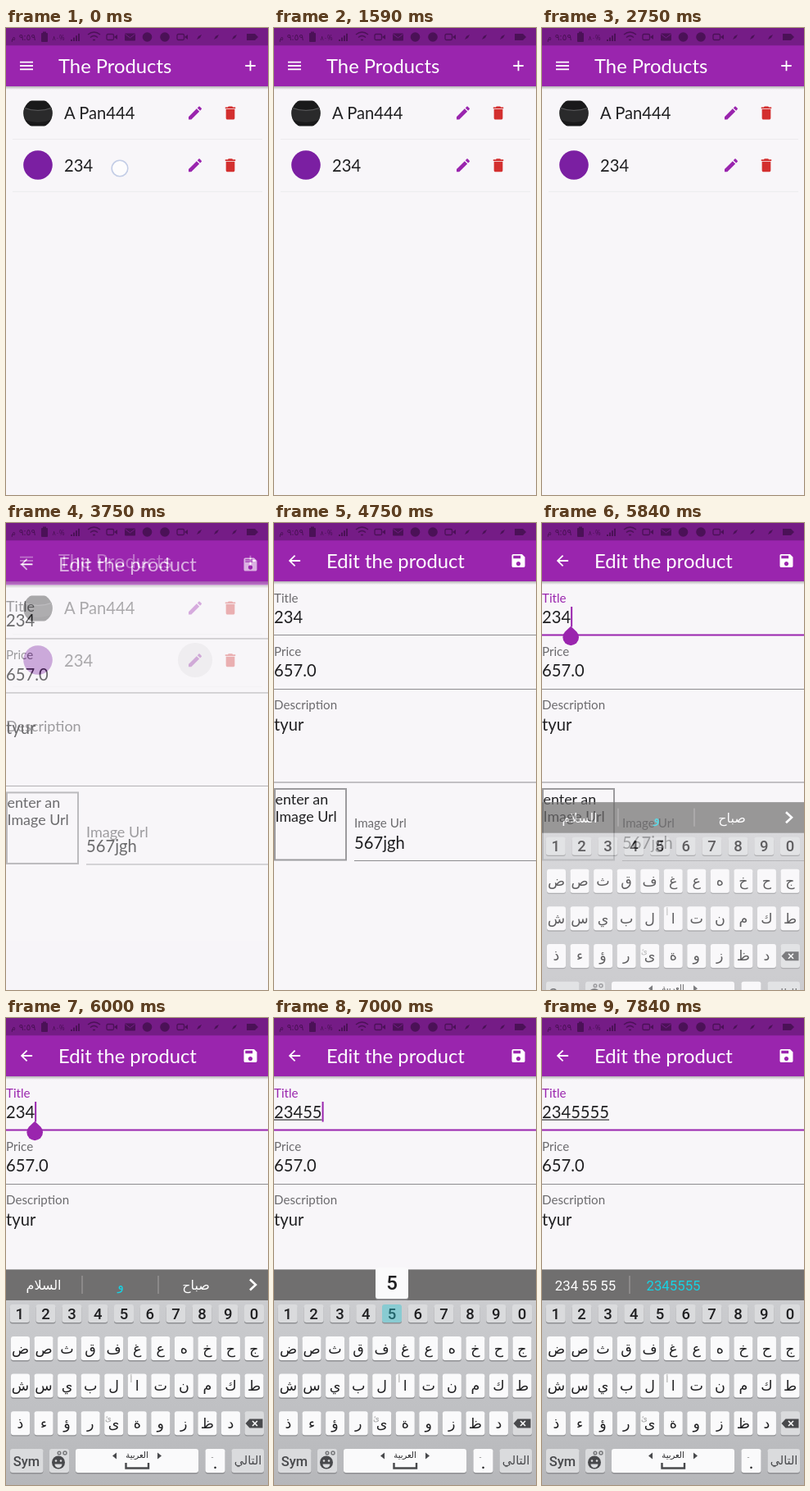
Recreate the animation shown at these times as an HTML page. Size 320 by 569 pixels, loop 8 s.

```html
<!DOCTYPE html>
<html lang="en">
<head>
<meta charset="utf-8">
<title>Product editor</title>
<style>
html, body { margin: 0; width: 100%; height: 100%; overflow: hidden; background: #f8f6f9; }
svg { display: block; width: 100vw; height: 100vh; }
text { font-family: Lato, sans-serif; font-size: 20.2px; fill: #202022; }
.bar { font-size: 23.8px; fill: #fff; }
.label { font-size: 15.15px; fill: #6c6b6e; }
.hint { font-size: 17.9px; }
.mid { text-anchor: middle; }
.num, .pick { font-family: Roboto, sans-serif; text-anchor: middle; }
.num { font-size: 18.5px; font-weight: 500; }
.pick { font-size: 16.8px; fill: #fff; }
.ar { font-family: "Noto Sans", "DejaVu Sans", sans-serif; font-size: 17.5px; text-anchor: middle; }
.cyan { fill: #16d3e4; }
</style>
</head>
<body>
<svg id="stage" viewBox="0 0 320 569" preserveAspectRatio="none">
  <defs>
    <linearGradient id="shade" x2="0" y2="1">
      <stop stop-color="#000" stop-opacity=".28"/><stop offset="1" stop-color="#000" stop-opacity="0"/>
    </linearGradient>
    <linearGradient id="board" x2="0" y2="1">
      <stop stop-color="#cfd0d3"/><stop offset="1" stop-color="#b6b7ba"/>
    </linearGradient>
    <clipPath id="round"><circle cx="39" cy="104" r="17.8"/></clipPath>
  </defs>
  <g id="list"></g>
  <g id="edit"></g>
  <g id="status"></g>
  <g id="keyboard"></g>
  <g id="popup"></g>
  <circle id="ring" r="9.8" fill="#fff" fill-opacity=".65" stroke="#c3cde6" stroke-width="1.6"/>
</svg>
<script>
const LOOP = 8000, DIGIT = 11.72, PURPLE = '#9a25ae';
const $ = id => document.getElementById(id);
const icons = {
  menu: 'M3 18h18v-2H3v2zm0-5h18v-2H3v2zm0-7v2h18V6H3z',
  add: 'M19 13h-6v6h-2v-6H5v-2h6V5h2v6h6v2z',
  back: 'M20 11H7.83l5.59-5.59L12 4l-8 8 8 8 1.41-1.41L7.83 13H20v-2z',
  save: 'M17 3H5c-1.11 0-2 .9-2 2v14c0 1.1.89 2 2 2h14c1.1 0 2-.9 2-2V7l-4-4zm-5 16c-1.66 0-3-1.34-3-3s1.34-3 3-3 3 1.34 3 3-1.34 3-3 3zm3-10H5V5h10v4z',
  pencil: 'M3 17.25V21h3.75L17.81 9.94l-3.75-3.75L3 17.25zM20.71 7.04c.39-.39.39-1.02 0-1.41l-2.34-2.34c-.39-.39-1.02-.39-1.41 0l-1.83 1.83 3.75 3.75 1.83-1.83z',
  bin: 'M6 19c0 1.1.9 2 2 2h8c1.1 0 2-.9 2-2V7H6v12zM19 4h-3.5l-1-1h-5l-1 1H5v2h14V4z'
};

const text = (x, y, s, cls = '', extra = '') => `<text x="${x}" y="${y}" class="${cls}" ${extra}>${s}</text>`;
const rect = (x, y, w, h, fill, extra = '') => `<rect x="${x}" y="${y}" width="${w}" height="${h}" fill="${fill}" ${extra}/>`;
const path = (d, extra) => `<path d="${d}" ${extra}/>`;
const icon = (name, x, y, fill = '#fff') =>
  path(icons[name], `fill="${fill}" transform="translate(${x - 10.67} ${y - 10.67}) scale(.889)"`);
const appBar = (left, title, right) =>
  rect(0, 0, 320, 569, '#f8f6f9') + rect(0, 71, 320, 4, 'url(#shade)') + rect(0, 0, 320, 71, PURPLE) +
  icon(left, 25, 46) + text(64, 54.7, title, 'bar') + icon(right, 298.5, 46);

function drawList() {
  const row = (y, name) => text(71, y + 7.3, name) + icon('pencil', 231, y, PURPLE) +
    icon('bin', 274, y, '#d32f2f') + rect(8, y + 31.5, 305, 1, '#ecebed');
  return appBar('menu', 'The Products', 'add') + row(103.5, 'A Pan444') + row(167.3, '234') +
    `<g clip-path="url(#round)">${rect(19, 88.5, 40, 31, '#19191a', 'rx="9"')}` +
    path('M21 96Q39 103 57 96L55 112Q39 118 23 112Z', 'fill="#2a2a2b"') +
    path('M21 97Q39 104 57 97', 'fill="none" stroke="#58585a"') + '</g>' +
    '<circle cx="39" cy="167" r="17.8" fill="#7b1fa2"/>' +
    '<circle id="ripple" cx="231" cy="167" fill="#000" fill-opacity=".1"/>';
}

function drawEdit() {
  const line = (y, x = 0) => rect(x, y, 320 - x, 1, '#8d8c8f');
  const label = (id, x, y, s) => `<g id="${id}">${text(x, y, s, 'label')}</g>`;
  return appBar('back', 'Edit the product', 'save') +
    label('lTitle', 0, 96.5, 'Title') + text(0, 121.5, '234', '', 'id="value"') + line(136) +
    rect(0, 123.5, 1, 1.1, '#202022', 'id="composing"') +
    label('lPrice', 0, 162, 'Price') + text(0, 187.2, '657.0') + line(202) +
    label('lDesc', 0, 227.3, 'Description') + text(0, 252.5, 'tyur') + line(315.5) +
    rect(1, 324, 87, 86.5, 'none', 'stroke="#9c9b9e" stroke-width="2"') +
    text(1.5, 342.5, 'enter an', 'hint') + text(1.5, 363.5, 'Image Url', 'hint') +
    label('lUrl', 98, 371.3, 'Image Url') + text(98, 396.8, '567jgh') + line(411, 98) +
    `<g id="focus">${rect(0, 135.5, 320, 2, PURPLE)}</g>` +
    rect(0, 102, 2, 24.5, PURPLE, 'id="caret"') +
    path('M35.2 125.8L42.3 132.6A9.8 9.8 0 1 1 28.1 132.6Z', `id="handle" fill="${PURPLE}"`);
}

function drawStatus() {
  const ink = '#4b1157', stroke = `fill="none" stroke="${ink}" stroke-width="1.3"`;
  const cam = x => rect(x - 6, 7.5, 8.5, 7, 'none', `rx="1.5" stroke="${ink}" stroke-width="1.3"`) +
    path(`M${x + 3} 11l4-3v6z`, `fill="${ink}"`);
  const small = (x, s, size) => text(x, 15, s, 'ar', `style="font-size:${size}px;fill:${ink}"`);
  const bars = [0, 1, 2, 3].map(i => rect(79 + i * 3, 14 - i * 2.4, 2, 2 + i * 2.4, ink)).join('');
  const leaves = [236, 257, 279].map(x => path(`M${x - 3} 14l2-4 4-2-2 4z`, `fill="${ink}"`)).join('');
  return rect(0, 0, 320, 21.3, '#751c86') + small(9, 'م', 9) + small(26, '٩:٥٩', 11) +
    rect(43, 6, 8, 11, ink, 'rx="1"') + rect(45, 4.5, 4, 2, ink) + small(64, '٨٠%', 8) + bars +
    path('M100 8Q107.500 2 115 8M103 11.500Q107.500 7.500 112 11.500M106 14.500h3', stroke) +
    cam(129) + rect(145, 6.5, 13, 9, ink, 'rx="1"') +
    path('M145.500 7.500l6 4.500 6-4.500', 'fill="none" stroke="#751c86"') +
    `<circle cx="172.500" cy="11" r="5.800" fill="${ink}"/><circle cx="194" cy="11" r="5.800" fill="${ink}"/>` +
    cam(215) + leaves + path('M294 7h10l4 4-4 4h-10z', `fill="${ink}"`);
}

function key(x, y, w, h, fill) {
  return rect(x, y + 1.4, w, h, '#8f9093', 'rx="3"') + rect(x, y, w, h, fill, 'rx="3"');
}

function drawKeyboard() {
  const grey = '#dadbdd', white = '#fafafb', dark = '#48494c';
  let s = rect(0, 306.5, 320, 263, 'url(#board)') + rect(0, 306.5, 320, 37.5, '#706f6f');
  const divider = x => rect(x, 314, 1, 22, '#a5a4a4');
  s += `<g id="greetings">${divider(92.5)}${divider(185.5)}` +
    text(46, 331, 'السلام', 'ar', 'style="fill:#fff;font-size:16px"') +
    text(140, 331, 'و', 'ar cyan', 'style="font-size:16px"') +
    text(232, 331, 'صباح', 'ar', 'style="fill:#fff;font-size:16px"') +
    path('M298 318.500l7 6.500-7 6.500', 'fill="none" stroke="#fff" stroke-width="2.600"') + '</g>';
  s += `<g id="guesses">${divider(106.5)}${text(53, 332, '234 55 55', 'pick')}${text(160.5, 332, '2345555', 'pick cyan')}</g>`;
  [...'1234567890'].forEach((n, i) => {
    const x = 16.8 + i * 31.8;
    s += key(x - 12, 349, 24, 22, grey) + text(x, 366.7, n, 'num');
  });
  s += rect(132, 349, 24, 22, '#25b7c6', 'id="pressed" rx="3" fill-opacity=".45"');
  ['ضصثقفغعهخحج', 'شسيبلاتنمكط', 'ذءؤرىةوزظد'].forEach((row, r) => {
    const y = 388 + r * 45.6;
    [...row].forEach((c, i) => {
      const x = 17.5 + i * 28.55;
      s += key(x - 11.5, y, 23, 29, white) + text(x, y + 20.5, c, 'ar');
    });
  });
  s += text(153, 444, 'أ', 'ar', 'style="font-size:10px;fill:#999"') +
    text(125, 491, 'ئ', 'ar', 'style="font-size:10px;fill:#999"');
  s += key(291.5, 479.2, 23.5, 29, grey) + path('M292.500 494l5-5.500h16v11h-16z', `fill="${dark}"`) +
    path('M301 491l6 6m0-6l-6 6', 'stroke="#fff" stroke-width="1.500"');
  s += key(5, 525, 40.5, 29, grey) + text(25, 545.5, 'Sym', 'num', `style="font-size:16.5px;fill:${dark}"`) +
    key(53, 525, 24, 29, grey) + `<circle cx="64" cy="541.500" r="8" fill="${dark}"/>` +
    path('M59.500 543.500h9a4.500 4.500 0 0 1-9 0z', `fill="${grey}"`) +
    `<circle cx="61" cy="539.500" r="1.300" fill="${grey}"/><circle cx="67" cy="539.500" r="1.300" fill="${grey}"/>` +
    '<g fill="none" stroke="#77787b" stroke-width="1.500"><circle cx="65" cy="530" r="1.800"/><circle cx="72" cy="530" r="2"/></g>';
  s += key(85, 525, 150, 29, white) + text(160, 536, 'العربية', 'ar', 'style="font-size:10px"') +
    path('M135 529.500v8l-5-4zM185 529.500v8l5-4z', `fill="${dark}"`) +
    path('M146.500 542v6.500h27.500v-6.500', `fill="none" stroke="${dark}" stroke-width="2.400"`) +
    key(243.5, 525, 24, 29, white) + text(255.5, 549, '.', 'num') +
    text(252, 538, '-', 'num', 'style="font-size:9px;fill:#999"') +
    key(275.5, 525, 39.5, 29, grey) + text(295.5, 544, 'التالي', 'ar', `style="font-size:14.5px;fill:${dark}"`);
  return s;
}

$('list').innerHTML = drawList();
$('edit').innerHTML = drawEdit();
$('status').innerHTML = drawStatus();
$('keyboard').innerHTML = drawKeyboard();
$('popup').innerHTML = key(124, 304, 40, 38, '#fafafb') + text(144, 331, '5', 'num', 'style="font-size:24px"');

// Each step is [time, ...values]; values are interpolated between steps.
function track(t, steps) {
  const i = steps.findIndex(s => s[0] > t);
  if (i < 0) return steps[steps.length - 1].slice(1);
  if (i === 0) return steps[0].slice(1);
  const a = steps[i - 1], b = steps[i], k = (t - a[0]) / (b[0] - a[0]);
  return a.slice(1).map((v, j) => v + (b[j + 1] - v) * k);
}
const within = (t, a, b) => t >= a && t < b;
const show = (id, on) => $(id).setAttribute('visibility', on ? 'visible' : 'hidden');
const pose = (id, opacity, y) => {
  $(id).setAttribute('opacity', opacity);
  $(id).setAttribute('transform', `translate(0 ${y})`);
};

const presses = [6590, 6920, 7170, 7420];
// time, x, y, opacity
const touch = [
  [0, 139, 171, 1], [90, 139, 171, 1], [500, 140, 173, .3], [590, 140, 173, 0],
  [2080, 200, 164, 0], [2090, 200, 164, .8], [2600, 230, 165, .8], [2750, 231, 165, 0],
  [3410, 231, 166, 0], [3420, 231, 166, .9], [3580, 231, 166, .9], [3670, 231, 166, 0],
  [5490, 90, 115, 0], [5500, 90, 115, .9], [5590, 90, 115, .9], [5670, 90, 115, 0]
];
const pageIn = [[3710, .5, 10], [3750, .64, 4.5], [3840, .94, .6], [3920, 1, 0]];
const boardIn = [[5670, 0, 130], [5750, .35, 78], [5840, .7, 34], [5920, .93, 8], [6000, 1, 0]];
const floating = { lTitle: [0, 96.5, 7.5], lDesc: [0, 227.3, 22], lUrl: [98, 371.3, 7.5] };

function render(t) {
  const [x, y, seen] = track(t, touch);
  $('ring').setAttribute('cx', x);
  $('ring').setAttribute('cy', y);
  $('ring').setAttribute('opacity', seen);

  show('ripple', within(t, 3420, 3920));
  $('ripple').setAttribute('r', track(t, [[3420, 6], [3640, 21]])[0]);

  const [alpha, dy] = track(t, pageIn);
  pose('edit', t < 3710 ? 0 : alpha, dy);
  const [drop] = track(t, [[3710, 1.3], [3750, 1], [3840, .3], [3920, 0]]);
  for (const [id, [lx, ly, shift]] of Object.entries(floating))
    $(id).setAttribute('transform',
      `translate(${lx} ${ly + shift * drop}) scale(${1 + .19 * drop}) translate(${-lx} ${-ly})`);

  const focused = t >= 5500;
  const typed = presses.filter(p => t >= p).length;
  const end = DIGIT * (3 + typed);
  $('lTitle').firstChild.style.fill = focused ? PURPLE : '';
  $('focus').setAttribute('opacity', track(t, [[5500, .3], [5670, 1]])[0]);
  show('focus', focused);
  show('handle', within(t, 5500, presses[0]));
  show('caret', within(t, 5500, 7750));
  $('caret').setAttribute('x', end);
  $('value').textContent = '234' + '5'.repeat(typed);
  show('composing', typed > 0);
  $('composing').setAttribute('width', end);

  const [solid, slide] = track(t, boardIn);
  pose('keyboard', solid, slide);
  show('greetings', t < 6090);
  show('guesses', t >= 7590);
  const down = presses.some(p => within(t, p, p + 150));
  show('popup', down);
  show('pressed', down);
}

function frame(now) {
  render(now % LOOP);
  requestAnimationFrame(frame);
}
render(0);
const start = performance.now();
requestAnimationFrame(function tick() {
  frame.started = start;
  render((performance.now() - start) % LOOP);
  requestAnimationFrame(tick);
});
</script>
</body>
</html>
```
